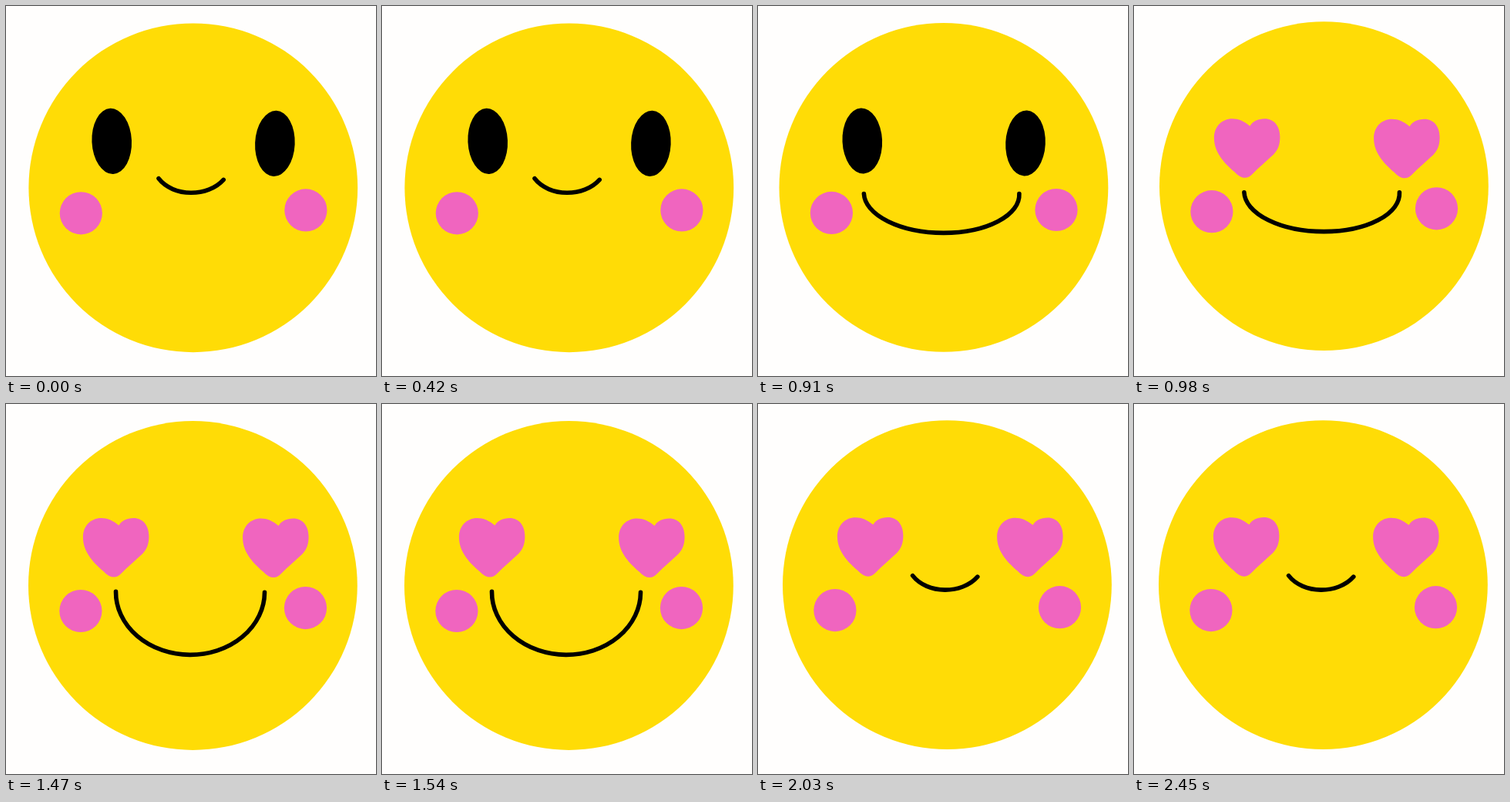
An HTML page for the animation above (2520 ms loop, 480 by 480 pixels).

```html
<!DOCTYPE html>
<html lang="en">
<head>
<meta charset="utf-8">
<title>Smiley in love</title>
<style>
  html, body { margin: 0; width: 100%; height: 100%; overflow: hidden; background: #fffefd; }
  svg { display: block; width: 100%; height: 100%; }
  .pink { fill: #f065bf; }
  #mouth { fill: none; stroke: #000; stroke-width: 5.6; stroke-linecap: round; }
</style>
</head>
<body>
<svg viewBox="0 0 480 480">
  <defs>
    <path id="heart" class="pink" d="M146.8 157.8C139 151.5 132 148.4 124 148.4C110 148.4 100.3 159 100.3 173
      C100.3 191 112 204.5 126.5 217C135.5 226.5 143.5 227.5 150.5 219.5C158 211.5 168 203.5 177.5 194.5
      C183 189 185.8 182 185.8 172C185.8 158 178 148.3 166 148.3C157 148.3 150 152 146.8 157.8Z"/>
  </defs>
  <g id="face">
    <circle cx="242.8" cy="235.8" r="213.4" fill="#ffdc06"/>
    <g id="eyes">
      <ellipse cx="137.2" cy="175.4" rx="25.8" ry="42.6" transform="rotate(-2.6 137.2 175.4)"/>
      <ellipse cx="348.9" cy="178.4" rx="25.8" ry="42.6" transform="rotate(2.6 348.9 178.4)"/>
    </g>
    <g id="hearts">
      <use href="#heart"/>
      <use href="#heart" x="207.2" y="0.5"/>
    </g>
    <circle class="pink" cx="97.3" cy="268.8" r="27.6"/>
    <circle class="pink" cx="388.9" cy="264.9" r="27.6"/>
    <path id="mouth"/>
  </g>
</svg>
<script>
  const LOOP = 2520, HOLD = 490;
  const smallSmile = 'M198 223.8C217 248.2 262 248.2 282.2 225.4';
  const wideSmile = 'M139.3 244A100.7 50.7 1 0 0 340.8 244';
  const deepSmile = 'M142.9 243.7A96.5 81.5 0 0 0 335.9 244.7';

  const poses = [
    { x: 0, y: 0, mouth: smallSmile, love: false },
    { x: -1.9, y: -0.4, mouth: wideSmile, love: false },
    { x: 3.6, y: -2.1, mouth: wideSmile, love: true },
    { x: -0.4, y: -0.3, mouth: deepSmile, love: true },
    { x: 2.6, y: -1.2, mouth: smallSmile, love: true }
  ];

  const [face, eyes, hearts, mouth] = ['face', 'eyes', 'hearts', 'mouth']
    .map(id => document.getElementById(id));
  const show = (part, on) => part.setAttribute('visibility', on ? 'visible' : 'hidden');

  function draw(time) {
    // The last pose stays slightly longer than the others.
    const index = Math.min(Math.floor(time % LOOP / HOLD), poses.length - 1);
    const pose = poses[index];
    face.setAttribute('transform', `translate(${pose.x} ${pose.y})`);
    mouth.setAttribute('d', pose.mouth);
    show(eyes, !pose.love);
    show(hearts, pose.love);
  }

  const start = performance.now();
  function tick() {
    draw(performance.now() - start);
    requestAnimationFrame(tick);
  }
  tick();
</script>
</body>
</html>
```
